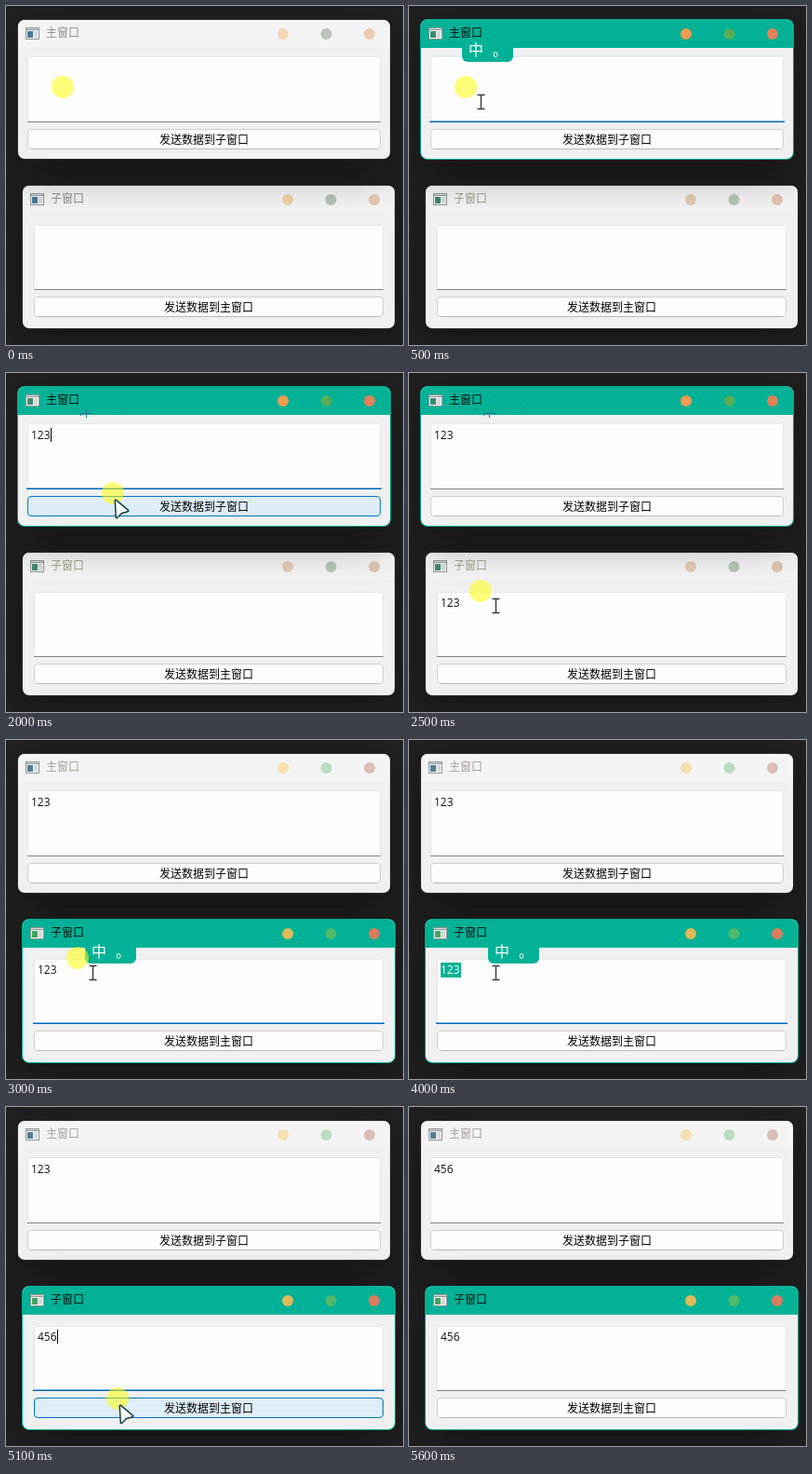
Recreate the animation shown at these times as an HTML page with a canvas. Size 427 by 364 pixels, loop 6100 ms.

```html
<!DOCTYPE html>
<html lang="zh-CN">
<head>
<meta charset="utf-8">
<title>窗口通信</title>
<style>
  html, body { margin: 0; width: 100%; height: 100%; overflow: hidden; background: #202020; }
  canvas { display: block; width: 427px; height: 364px; }
</style>
</head>
<body>
<canvas id="stage" width="427" height="364"></canvas>
<script>
const ctx = document.getElementById('stage').getContext('2d');
const LOOP = 6100;
const GREEN = '#03b196', BLUE = '#0067b8';
const CJK = '"Noto Sans CJK SC", "Noto Sans CJK", sans-serif';
const LATIN = '"Open Sans", "Noto Sans", sans-serif';
const DIGIT = 6.9;

const main = {
  title: '主窗口', label: '发送数据到子窗口',
  x: 13, y: 15, w: 400, h: 149,
  edit: [23, 54, 380, 71], button: [23, 132, 380, 22], text: [27, 71]
};
const sub = {
  title: '子窗口', label: '发送数据到主窗口',
  x: 18, y: 193, w: 400, h: 153,
  edit: [30, 235, 376, 70], button: [30, 312, 376, 22], text: [34, 251]
};

const looks = {
  idleMain: { title: '#8b8b8b', dots: ['#f5d5b6', '#bac2b9', '#edc9b2'], block: '#48789a' },
  idleSub: { title: '#878889', dots: ['#f1d2a9', '#b3c2b4', '#ebc6b1'], block: '#48789a' },
  liveMain: { title: '#00140f', dots: ['#ed9c51', '#57ad58', '#df8159'], block: '#3c8a70', live: true },
  behindSub: { title: '#9a9f87', dots: ['#e3cab4', '#b6c5b6', '#e1c4ae'], block: '#3d8a70' },
  behindMain: { title: '#a69e9b', dots: ['#f4dfaf', '#badcc0', '#dabdb7'], block: '#547d92' },
  liveSub: { title: '#00140f', dots: ['#deb957', '#4fba69', '#d97c5f'], block: '#40a65f', live: true }
};

// Each step overrides the defaults below from its start time on.
const rest = { active: null, focus: false, m: '', s: '' };
const steps = [
  { at: 0, spot: [61, 87] },
  { at: 500, active: main, focus: true, ime: true, spot: [61, 87], beam: [77, 103] },
  { at: 1000, active: main, focus: true, ime: true, m: '1', caret: true, beam: [85, 102] },
  { at: 1500, active: main, focus: true, ime: true, m: '12', caret: true, beam: [85, 102] },
  { at: 2000, active: main, focus: true, m: '123', caret: true, trace: true, hover: true, spot: [115, 129], arrow: [117, 136] },
  { at: 2500, active: main, m: '123', s: '123', trace: true, spot: [77, 234], beam: [93, 250] },
  { at: 3000, active: sub, focus: true, ime: true, m: '123', s: '123', spot: [77, 234], beam: [93, 250] },
  { at: 3500, active: sub, focus: true, ime: true, m: '123', s: '123', beam: [93, 250] },
  { at: 4000, active: sub, focus: true, ime: true, m: '123', s: '123', selected: true, beam: [93, 250] },
  { at: 4500, active: sub, focus: true, ime: true, m: '123', s: '4', caret: true, beam: [93, 250] },
  { at: 4600, active: sub, focus: true, m: '123', s: '45', caret: true, beam: [93, 250] },
  { at: 5100, active: sub, focus: true, m: '123', s: '456', caret: true, hover: true, spot: [120, 313], arrow: [122, 320] },
  { at: 5600, active: sub, m: '456', s: '456' }
];

function rect(x, y, w, h, fill) {
  ctx.fillStyle = fill;
  ctx.fillRect(x, y, w, h);
}

function round(x, y, w, h, r, fill, stroke) {
  ctx.beginPath();
  ctx.roundRect(x, y, w, h, r);
  if (fill) { ctx.fillStyle = fill; ctx.fill(); }
  if (stroke) { ctx.strokeStyle = stroke; ctx.lineWidth = 1; ctx.stroke(); }
}

function disc(x, y, r, fill) {
  ctx.beginPath();
  ctx.arc(x, y, r, 0, Math.PI * 2);
  ctx.fillStyle = fill;
  ctx.fill();
}

function write(str, x, y, size, color, family = CJK, align = 'left') {
  ctx.font = `${size}px ${family}`;
  ctx.textAlign = align;
  ctx.fillStyle = color;
  ctx.fillText(str, x, y);
}

function drawIcon(x, y, block) {
  rect(x, y, 15, 13, '#8e9695');
  rect(x + 1, y + 1, 13, 1, '#d8dcdc');
  rect(x + 1, y + 3, 13, 9, '#f4f4f4');
  rect(x + 2, y + 4, 6, 7, block);
  rect(x + 9, y + 4, 4, 7, '#d5d9d9');
}

function drawEdit(win, content, focused, state) {
  const [x, y, w, h] = win.edit;
  round(x, y, w, h, 2, '#fdfdfd');
  round(x + .5, y + .5, w - 1, h - 1, 2, null, '#e6e6e6');
  if (focused) rect(x - 1, y + h - 1.5, w + 2, 1.5, BLUE);
  else rect(x, y + h - 1, w, 1, '#858585');

  const [tx, ty] = win.text;
  const selected = focused && state.selected;
  if (selected) rect(tx, ty - 12, 22, 16, GREEN);
  write(content, tx, ty, 12, selected ? '#fff' : '#111', LATIN);
  if (focused && state.caret) rect(Math.round(tx + content.length * DIGIT), ty - 12, 1, 15, '#000');
}

function drawButton(win, hover) {
  const [x, y, w, h] = win.button;
  round(x + .5, y + .5, w - 1, h - 1, 3.5, hover ? '#deedf7' : '#fdfdfd', hover ? '#0078bd' : '#cfcfcf');
  if (!hover) rect(x + 4, y + h - 1, w - 8, 1, '#b9b9b9');
  write(win.label, x + w / 2, y + 16, 12, '#000', CJK, 'center');
}

function drawWindow(win, look, content, state) {
  const { x, y, w, h } = win;
  ctx.save();
  ctx.shadowColor = 'rgba(0,0,0,.4)';
  ctx.shadowBlur = 48;
  ctx.shadowOffsetY = 13;
  if (look.live) round(x - 1, y - 1, w + 2, h + 2, 8, GREEN);
  else round(x - .5, y - .5, w + 1, h + 1, 8, '#4a4a4a');
  ctx.restore();

  ctx.save();
  ctx.beginPath();
  ctx.roundRect(x, y, w, h, 7);
  ctx.clip();
  rect(x, y, w, h, '#f0f0f0');
  rect(x, y, w, 30, look.live ? GREEN : '#f3f3f3');
  ctx.restore();

  drawIcon(x + 8, y + 8, look.block);
  write(win.title, x + 30, y + 18, 12, look.title);
  look.dots.forEach((color, i) => disc(x + 285 + i * 46.5, y + 15, 6, color));

  const live = state.active === win;
  drawEdit(win, content, live && state.focus, state);
  drawButton(win, live && state.hover);
}

function drawIme(win, count) {
  const x = win.text[0] + 30 + 7 * count, y = win.text[1] - 33;
  round(x, y, 55, 22, [0, 0, 6, 6], GREEN);
  write('中', x + 15, y + 15, 16, '#fff', CJK, 'center');
  write('。', x + 33, y + 15, 16, '#fff');
}

function drawTrace() {
  rect(80, 43, 13, 1, '#26749a');
  rect(86, 39, 1, 9, '#26749a');
  rect(80, 43, 1, 3, '#2a8b9e');
  rect(71, 38, 2, 1, '#168b8b');
  rect(123, 37, 2, 1, '#168b8b');
  rect(125, 39, 1, 1, '#168b8b');
}

function drawBeam([x, y]) {
  const path = new Path2D(`M${x - 3.5} ${y - 7.5}H${x + 4.5}M${x - 3.5} ${y + 7.5}H${x + 4.5}M${x + .5} ${y - 7.5}V${y + 7.5}`);
  for (const [width, color] of [[3, 'rgba(235,235,235,.9)'], [1.4, '#3c4444']]) {
    ctx.lineWidth = width;
    ctx.strokeStyle = color;
    ctx.stroke(path);
  }
}

function drawArrow([x, y]) {
  const path = new Path2D(`M${x + 1} ${y + 1}L${x + 2} ${y + 19}L${x + 7} ${y + 14}L${x + 14} ${y + 12}Z`);
  ctx.lineJoin = 'round';
  ctx.lineWidth = 3;
  ctx.strokeStyle = '#143f3f';
  ctx.stroke(path);
  ctx.fillStyle = '#fff';
  ctx.fill(path);
}

function draw(time) {
  const state = { ...rest, ...steps.findLast(step => step.at <= time) };
  const { active } = state;
  const mainLook = active === main ? looks.liveMain : active ? looks.behindMain : looks.idleMain;
  const subLook = active === sub ? looks.liveSub : active ? looks.behindSub : looks.idleSub;
  const paintMain = () => drawWindow(main, mainLook, state.m, state);
  const paintSub = () => drawWindow(sub, subLook, state.s, state);

  rect(0, 0, 427, 364, '#212121');
  if (active === sub) { paintMain(); paintSub(); }
  else { paintSub(); paintMain(); }

  if (state.trace) drawTrace();
  if (state.ime) drawIme(active, (active === main ? state.m : state.s).length);
  if (state.spot) disc(...state.spot, 12, 'rgba(255,255,0,.52)');
  if (state.beam) drawBeam(state.beam);
  if (state.arrow) drawArrow(state.arrow);
}

const start = performance.now();
function tick() {
  draw((performance.now() - start) % LOOP);
  requestAnimationFrame(tick);
}
tick();
</script>
</body>
</html>
```
